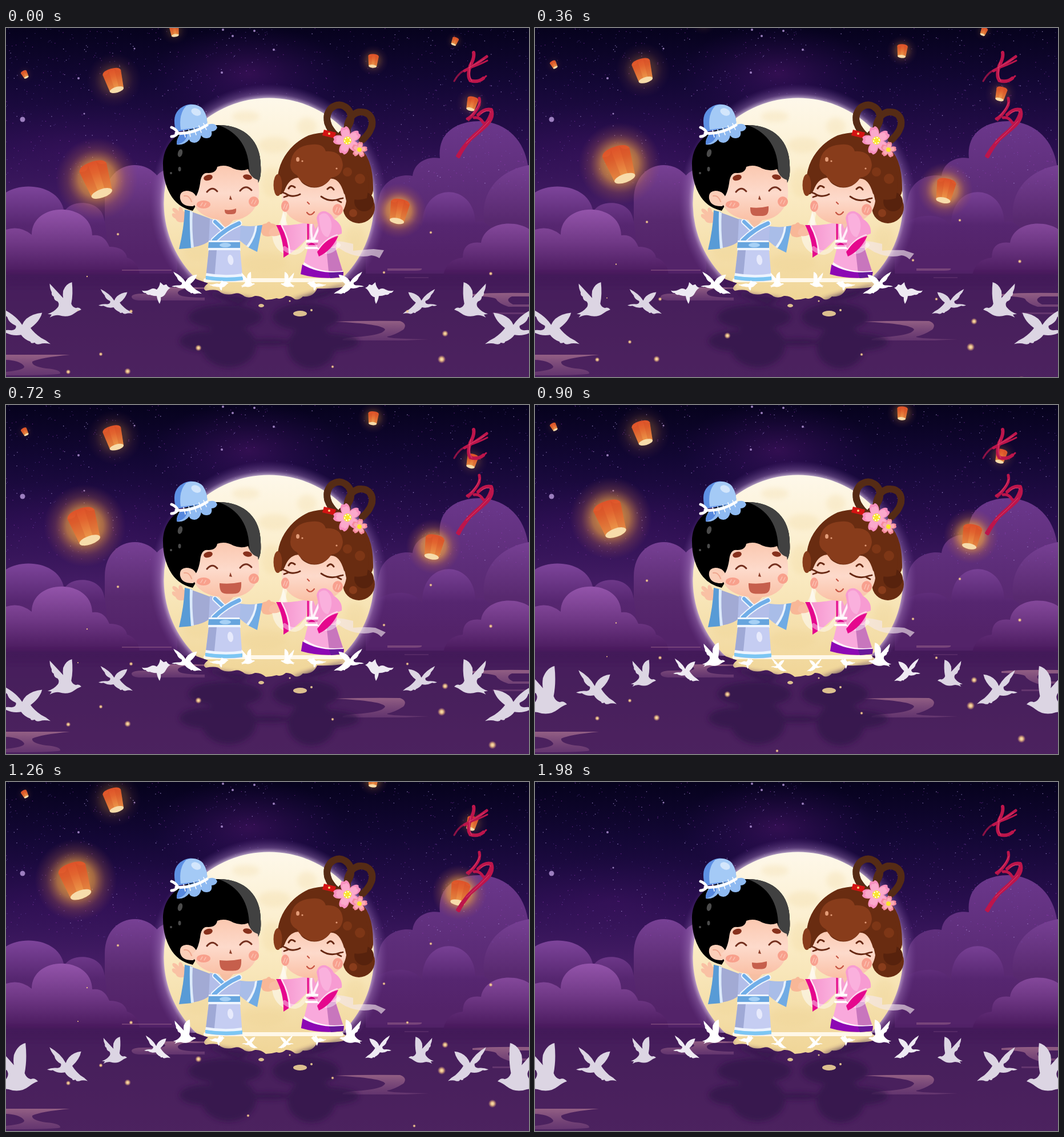
Recreate the animation shown at these times as an HTML page. Size 916 by 611 pixels, loop 2160 ms.

```html
<!DOCTYPE html>
<html lang="zh">
<head>
<meta charset="utf-8">
<title>七夕</title>
<style>
html, body { margin: 0; height: 100%; overflow: hidden; background: #2b1052; }
svg { display: block; width: 100vw; height: 100vh; }
.line { fill: none; stroke-linecap: round; stroke-linejoin: round; }
</style>
</head>
<body>
<svg viewBox="0 0 916 611" preserveAspectRatio="none">
<defs>
  <linearGradient id="sky" x2="0" y2="1">
    <stop stop-color="#06021d"/><stop offset=".16" stop-color="#130735"/><stop offset=".34" stop-color="#280e4d"/>
    <stop offset=".5" stop-color="#421b63"/><stop offset=".64" stop-color="#552468"/><stop offset=".71" stop-color="#411957"/>
    <stop offset=".8" stop-color="#462059"/><stop offset="1" stop-color="#50255f"/>
  </linearGradient>
  <radialGradient id="nebula"><stop stop-color="#7a2296" stop-opacity=".32"/><stop offset="1" stop-color="#4a1680" stop-opacity="0"/></radialGradient>
  <linearGradient id="backL" gradientUnits="userSpaceOnUse" x1="0" x2="0" y1="240" y2="400"><stop stop-color="#774094"/><stop offset=".6" stop-color="#58296f"/><stop offset="1" stop-color="#532369"/></linearGradient>
  <linearGradient id="midL" gradientUnits="userSpaceOnUse" x1="0" x2="0" y1="278" y2="400"><stop stop-color="#7d449a"/><stop offset=".55" stop-color="#562670"/><stop offset="1" stop-color="#532369"/></linearGradient>
  <linearGradient id="front" gradientUnits="userSpaceOnUse" x1="0" x2="0" y1="318" y2="432"><stop stop-color="#9354aa"/><stop offset=".5" stop-color="#703886"/><stop offset="1" stop-color="#48195c"/></linearGradient>
  <linearGradient id="backR" gradientUnits="userSpaceOnUse" x1="0" x2="0" y1="163" y2="400"><stop stop-color="#6b378b"/><stop offset=".5" stop-color="#5d2d79"/><stop offset="1" stop-color="#552469"/></linearGradient>
  <linearGradient id="moon" x2="0" y2="1"><stop stop-color="#fef8ea"/><stop offset=".45" stop-color="#fbecc6"/><stop offset="1" stop-color="#f0d597"/></linearGradient>
  <radialGradient id="halo"><stop offset=".88" stop-color="#efdcf5" stop-opacity=".7"/><stop offset=".92" stop-color="#b88fd0" stop-opacity=".34"/><stop offset="1" stop-color="#8053a8" stop-opacity="0"/></radialGradient>
  <linearGradient id="skin" x2="0" y2="1"><stop stop-color="#fbc8b0"/><stop offset=".5" stop-color="#fddacb"/><stop offset="1" stop-color="#fac0a5"/></linearGradient>
  <linearGradient id="paper" x2="0" y2="1"><stop stop-color="#de5129"/><stop offset=".35" stop-color="#e2642f"/><stop offset="1" stop-color="#eda04e"/></linearGradient>
  <radialGradient id="glow"><stop stop-color="#ffb03a" stop-opacity=".95"/><stop offset=".45" stop-color="#f0a040" stop-opacity=".62"/><stop offset=".72" stop-color="#c07048" stop-opacity=".24"/><stop offset="1" stop-color="#a05050" stop-opacity="0"/></radialGradient>
  <radialGradient id="spark"><stop stop-color="#ffe9b8"/><stop offset=".4" stop-color="#f5c98a" stop-opacity=".9"/><stop offset="1" stop-color="#d89a70" stop-opacity="0"/></radialGradient>
  <linearGradient id="stream" x2="0" y2="1"><stop stop-color="#b98098" stop-opacity=".66"/><stop offset="1" stop-color="#8a5488" stop-opacity=".4"/></linearGradient>
  <linearGradient id="sleeve" x2="1" y2="0"><stop stop-color="#f58fcb"/><stop offset="1" stop-color="#fbb4df"/></linearGradient>
  <filter id="blur" x="-30%" y="-30%" width="160%" height="160%"><feGaussianBlur stdDeviation="4"/></filter>
  <filter id="soft" x="-10%" y="-10%" width="120%" height="120%"><feGaussianBlur stdDeviation=".5"/></filter>
  <circle id="shine" r="72" fill="url(#glow)"/>
  <g id="lantern">
    <path fill="url(#paper)" d="M-25 -21Q-22 -31 0 -31T25 -21L19 27H-19Z"/>
    <path fill="#c84420" opacity=".25" d="M-25 -21Q-10 -15 -7 -28L-5 26H-19Z M9 -29Q14 -19 25 -21L19 27H7Z"/>
    <ellipse cy="27" rx="19" ry="7.5" fill="#f7dcaa"/>
  </g>
  <path id="up" d="M100 76Q92 68 84 72Q74 70 70 60Q76 34 72 0Q54 4 46 24Q44 36 46 44Q32 30 6 4Q6 18 12 28Q10 36 18 40Q18 50 30 54Q36 62 30 70Q18 84 0 88L12 90L6 98Q22 90 34 92Q60 100 80 86Q88 80 100 76Z"/>
  <path id="glide" d="M100 96Q92 86 82 80Q68 66 62 54Q80 36 84 14Q66 16 54 30Q48 38 46 46Q34 20 6 2Q10 16 18 26Q20 40 34 48Q36 58 26 60Q12 58 0 64Q8 68 14 66Q28 76 44 72Q50 84 62 90Q62 96 70 92Q72 98 80 96Q88 92 100 96Z"/>
  <path id="wide" d="M62 100Q68 84 66 70Q78 66 84 50Q92 30 100 26Q90 22 86 10L76 14L64 0Q62 22 52 34Q40 24 28 34Q14 44 0 38Q6 52 14 50Q18 60 28 58Q40 64 52 64Q54 84 62 100Z"/>
  <g id="petals"><path id="petal" d="M0 0C-12 -8 -9 -24 -3 -25Q0 -22 3 -25C9 -24 12 -8 0 0Z"/>
    <use href="#petal" transform="rotate(72)"/><use href="#petal" transform="rotate(144)"/><use href="#petal" transform="rotate(216)"/><use href="#petal" transform="rotate(288)"/></g>
</defs>

<rect width="916" height="611" fill="url(#sky)"/>
<ellipse cx="425" cy="80" rx="170" ry="85" fill="url(#nebula)"/>
<ellipse cx="130" cy="210" rx="260" ry="80" fill="url(#nebula)" opacity=".4"/>

<g id="clouds">
  <path fill="url(#backL)" d="M173 430V300C173 220 278 220 278 300V430ZM257 430V285C257 258 270 246 300 245V430Z"/>
  <path fill="url(#midL)" d="M0 430V288C30 268 95 275 102 322C112 300 160 300 170 328Q178 350 180 430Z"/>
  <path fill="url(#front)" d="M0 432V353Q25 345 45 362C45 303 150 303 151 363Q172 360 181 383Q208 383 212 402Q232 408 234 432Z"/>
  <path fill="url(#backR)" d="M630 430C635 380 645 330 655 290C665 262 695 255 712 259C715 235 738 224 760 228C755 183 790 163 830 163C880 165 908 200 914 240L916 430Z"/>
  <path fill="url(#backL)" d="M838 430V340C830 290 860 250 916 240V430Z"/>
  <path fill="url(#midL)" d="M729 430V350C725 268 820 268 822 340Q835 335 848 348V430ZM630 430V368C640 325 715 315 730 350V430Z"/>
  <path fill="url(#front)" d="M766 432Q772 405 800 402Q800 372 832 376C838 340 890 335 916 352V432Z"/>
</g>
<path d="M0 430H916V611H0Z" fill="#4a205f" opacity=".55"/>
<path d="M0 430H916V452H0Z" fill="#3f1757" opacity=".4" filter="url(#blur)"/>
<g id="stars"></g>

<g fill="url(#stream)">
  <path d="M220 470Q222 465 240 465H272Q285 462 273 457Q268 454 290 454H352V457H312Q296 461 303 467Q310 472 348 472V477H236Q220 477 220 470Z"/>
  <path d="M575 514Q640 512 690 513Q704 518 696 528Q680 538 668 540Q662 544 740 545L700 547H590Q585 543 612 541Q660 538 664 528Q660 518 575 514Z"/>
  <path d="M0 572H112Q60 577 46 584Q44 592 70 596Q96 598 95 605Q90 608 0 608V602Q40 598 30 590Q22 582 0 581Z"/>
  <path d="M817 466Q850 463 916 464V470H886Q872 476 888 484H916V488H880Q862 482 858 474Q850 470 817 469ZM852 498H916V501H852Z"/>
  <path opacity=".6" d="M203 423H290V425H203ZM668 421H728Q730 425 716 425H668ZM698 436H740V438H698Z"/>
</g>

<circle cx="460" cy="306" r="208" fill="url(#halo)" clip-path="inset(0 0 75px 0)"/>
<path fill="url(#moon)" d="M334 440A184 184 0 1 1 587 440Q600 444 596 450Q590 457 545 456Q538 472 520 470Q514 477 506 475Q498 468 490 469Q482 476 474 473Q464 476 455 476Q446 468 436 469Q426 474 418 470Q408 462 400 465Q386 469 376 463Q370 456 350 460Q342 456 354 447Z"/>
<g fill="#eccf8c" opacity=".22" filter="url(#blur)">
  <ellipse cx="527" cy="172" rx="17" ry="15"/><ellipse cx="470" cy="205" rx="28" ry="14"/><ellipse cx="465" cy="270" rx="18" ry="26"/>
  <ellipse cx="452" cy="410" rx="40" ry="17"/><ellipse cx="335" cy="390" rx="24" ry="17"/><ellipse cx="612" cy="370" rx="18" ry="25"/><ellipse cx="420" cy="155" rx="24" ry="10"/>
</g>
<g fill="#33124a" opacity=".75" filter="url(#blur)">
  <path d="M330 440Q348 452 350 462L400 470L432 474L410 484Q345 470 330 440ZM598 448L560 470Q528 480 498 478L540 464Z"/>
  <ellipse cx="384" cy="506" rx="64" ry="22"/><ellipse cx="390" cy="556" rx="48" ry="38"/><ellipse cx="350" cy="548" rx="46" ry="18"/>
  <ellipse cx="525" cy="506" rx="58" ry="24"/><ellipse cx="535" cy="558" rx="42" ry="38"/><ellipse cx="560" cy="550" rx="58" ry="16"/><ellipse cx="460" cy="550" rx="40" ry="6"/>
</g>
<g fill="#dcc08f"><ellipse cx="447" cy="486" rx="5" ry="3"/><ellipse cx="515" cy="500" rx="12" ry="5"/><circle cx="535" cy="494" r="2"/><circle cx="497" cy="478" r="1.5"/></g>
<rect x="346" y="438" width="245" height="7" rx="3.5" fill="#fff8e8" filter="url(#soft)"/>

<g id="lanterns"></g>

<g id="boy">
  <g id="boyArms">
    <path fill="#f9c1a4" d="M316 338Q301 344 297 334Q289 330 291 325Q294 323 298 326Q288 318 293 315Q297 314 303 321Q301 314 305 313Q310 315 310 320Q318 324 316 338Z"/>
    <path fill="#f8b797" d="M444 352Q446 343 456 342Q461 336 464 342Q474 343 474 348Q472 352 468 352Q476 356 470 361Q460 368 450 363Z"/>
    <path fill="#a2aad4" d="M314 318Q338 326 366 337L357 372Q342 385 304 386Q312 350 314 318Z"/>
    <path fill="#589bd6" d="M313 318L326 321Q322 350 326 385L303 387Q312 350 313 318Z"/>
    <path fill="#dceafa" d="M322 320L327 322Q325 352 329 384L324 385Q321 350 322 320Z"/>
    <path fill="#a9bde8" d="M396 343Q425 350 448 345L439 391Q415 380 404 366Z"/>
    <path fill="#70abe4" d="M440 346L449 345L440 392L424 384Q438 364 440 346Z"/>
    <path fill="#e9f2fd" d="M436 347L440 346Q438 366 425 384L421 382Q435 364 436 347Z"/>
  </g>
  <path fill="#b3bee9" d="M357 334L372 337L384 350L402 338L411 350L409 378H355Z"/>
  <path fill="#f6bfa3" d="M370 330H404L384 352Z"/>
  <path class="line" stroke="#eef5fe" stroke-width="10" d="M366 339L384 356"/>
  <path class="line" stroke="#71aee8" stroke-width="6" d="M366 339L384 356"/>
  <path class="line" stroke="#eef5fe" stroke-width="11" d="M408 342Q384 352 364 372"/>
  <path class="line" stroke="#71aee8" stroke-width="7" d="M408 342Q384 352 364 372"/>
  <path fill="#eef5fe" d="M355 372H409L411 390H354Z"/><path fill="#67a5de" d="M355 375H410V385H354Z"/>
  <ellipse cx="384" cy="380" rx="10" ry="4" fill="#a6d0f5"/>
  <g id="boySkirt">
    <path fill="#c5cdf2" d="M355 389H410L414 442Q382 446 349 440Z"/>
    <path fill="#9fa9d6" d="M355 389H369L364 440L349 439Z"/>
    <path fill="#edf4fe" d="M350 429Q382 435 413 430V436Q382 440 349 434Z"/>
    <path fill="#7cc6f3" d="M349 434Q382 439 414 435V441Q382 446 349 440Z"/>
    <ellipse cx="393" cy="406" rx="5" ry="9" fill="#e7eafc" transform="rotate(-8 393 406)"/>
  </g>
  <path fill="#000" d="M327 320Q300 314 287 290Q275 268 275 240C275 190 320 168 372 170C420 170 446 200 446 240Q448 262 440 274L345 290Z"/>
  <path fill="#414141" d="M372 170C420 170 446 200 446 240Q448 262 440 274L426 258Q428 190 372 170Z"/>
  <path fill="#fbceb8" d="M336 303Q332 285 316 285Q303 286 305 299Q308 313 328 312Z"/>
  <path class="line" stroke="#eea68e" stroke-width="2" d="M312 294Q321 292 325 304"/>
  <path fill="url(#skin)" d="M327 300Q336 296 340 272Q342 252 354 254Q368 254 370 243Q384 238 398 246Q412 252 424 247Q428 262 441 266Q446 290 440 306Q428 337 390 337C352 337 330 322 327 300Z"/>
  <g fill="#f8a08c"><ellipse cx="346" cy="309" rx="12" ry="7"/><ellipse cx="434" cy="304" rx="9" ry="9"/></g>
  <path class="line" stroke="#fbc0b0" stroke-width="1.5" d="M341 311L344 306M347 312L350 307M430 307L433 301M435 308L438 302"/>
  <g fill="#87301c"><ellipse cx="354" cy="262" rx="8" ry="5" transform="rotate(-15 354 262)"/><ellipse cx="423" cy="261" rx="8" ry="4.5" transform="rotate(12 423 261)"/></g>
  <path class="line" stroke="#74301f" stroke-width="3" d="M352 287Q361 276 370 286M410 285Q420 273 430 284"/>
  <path fill="#8d402c" d="M393 293L396 301L391 300Z"/>
  <path id="mouth" fill="#c65f4c"/>
  <g fill="#4b4b4b"><ellipse cx="305" cy="219" rx="4" ry="7" transform="rotate(15 305 219)"/><ellipse cx="304" cy="247" rx="2.5" ry="4"/><circle cx="289" cy="254" r="2"/></g>
  <path fill="#5e91e4" d="M298 182Q289 152 306 140Q325 126 344 142Q354 155 352 172Z"/>
  <path fill="#a4caf6" d="M306 178Q302 150 316 136Q334 130 345 142Q354 155 352 172Z"/>
  <ellipse cx="333" cy="147" rx="9" ry="6" fill="#d3e6fc" transform="rotate(25 333 147)"/>
  <path fill="#8fbaf1" d="M306 184L352 170Q366 164 370 174Q368 181 360 181Q362 192 352 193Q344 193 342 188Q340 200 330 201Q321 200 321 195Q312 206 299 204Q298 195 306 184Z"/>
  <path fill="#5688de" d="M306 186L318 182Q318 200 299 204Q298 195 306 186Z"/>
  <path class="line" stroke="#fff" stroke-width="5" d="M298 184Q325 187 352 170M290 174Q298 177 301 184Q296 190 290 190"/>
  <path class="line" stroke="#fff" stroke-width="1.5" d="M311 179L314 191M320 178L323 190M329 175L333 187M338 171L342 183M346 167L351 178"/>
</g>

<g id="girl">
  <path fill="#fff" opacity=".5" d="M486 322Q478 350 466 358Q466 385 488 396Q482 360 493 344Z"/>
  <path class="line" stroke="#fff" stroke-width="8" opacity=".45" d="M490 318Q480 352 494 372Q520 394 512 350"/>
  <path id="tail" fill="#f6e9ee" opacity=".62"/>
  <path fill="#f9bda2" d="M462 353Q468 347 478 349L480 362Q466 368 460 360Z"/>
  <path fill="url(#sleeve)" d="M528 340Q500 347 474 345Q486 372 487 401Q505 392 526 370Z"/>
  <path fill="#e5078d" d="M473 345L481 345Q495 370 495 396L486 402Q487 370 473 345Z"/>
  <path class="line" stroke="#ffe6f5" stroke-width="2.5" d="M483 346Q496 370 497 394"/>
  <path fill="#f6a0d3" d="M527 340H582L578 386H529Z"/><path fill="#f6c4b0" d="M536 338H552L542 352Z"/>
  <path class="line" stroke="#e5078d" stroke-width="3" d="M529 342V372"/><path class="line" stroke="#fff0f8" stroke-width="4" d="M535 341Q533 356 537 374M552 340L538 372"/>
  <g id="girlSkirt">
    <path fill="#f9a9dc" d="M529 384H577L591 430Q552 444 517 430Z"/>
    <path fill="#c876bd" d="M561 385H577L591 430Q580 436 566 436Z"/>
    <path fill="#fff4fa" d="M522 410Q550 430 590 425V430Q550 434 519 418Z"/>
    <path fill="#8d08b4" d="M519 414Q550 432 591 427L590 436Q550 441 516 431Z"/>
    <path fill="#68189b" d="M565 428L591 427L590 436L568 438Z"/>
  </g>
  <path class="line" stroke="#fff" stroke-width="4" d="M527 373H556M526 385H552"/><path class="line" stroke="#dc0c8c" stroke-width="4" d="M528 378H556"/>
  <path class="line" stroke="#fff" stroke-width="8" opacity=".42" d="M488 386Q508 402 522 382Q536 362 548 382Q560 402 582 380"/>

  <path id="loops" class="line" stroke="#552b15" stroke-width="12" d="M580 190C543 158 572 124 594 138C612 150 604 172 588 186M598 184C594 154 618 138 636 152C648 166 638 184 624 196"/>
  <use href="#loops" stroke-dasharray="4 10" style="stroke:#70401f"/>
  <path fill="#692c11" d="M474 285Q474 214 530 188Q590 170 626 216Q644 238 643 285Q640 306 605 306L560 270Z"/>
  <circle cx="618" cy="314" r="28" fill="#692c11"/><circle cx="627" cy="304" r="17" fill="#57220d"/><circle cx="608" cy="324" r="7" fill="#883c1b"/>
  <path fill="url(#skin)" d="M483 290Q488 262 506 256L576 258Q592 278 596 303Q590 343 536 343C498 343 482 320 483 290Z"/>
  <path fill="#692c11" d="M475 272Q476 214 530 192Q590 184 626 230Q640 260 632 298Q606 306 592 290Q584 262 568 264Q556 282 534 279Q516 274 514 262Q496 262 488 284Q482 296 475 288Z"/>
  <path fill="#883c1b" d="M498 240Q500 206 536 204Q556 202 560 216Q588 214 590 240Q588 260 570 262Q556 282 534 278Q514 270 510 258Q498 252 498 240Z"/>
  <ellipse cx="476" cy="275" rx="7.5" ry="19" fill="#883c1b"/>
  <g fill="#7d3616"><circle cx="598" cy="252" r="8"/><circle cx="620" cy="264" r="9"/></g>
  <g fill="#e39c78"><ellipse cx="511" cy="230" rx="3" ry="4"/><circle cx="519" cy="233" r="1.6"/><circle cx="579" cy="246" r="1.6"/></g>
  <g fill="#f8a08f"><ellipse cx="489" cy="312" rx="7" ry="10"/><ellipse cx="581" cy="318" rx="9" ry="10"/></g>
  <path class="line" stroke="#fcc2b4" stroke-width="1.5" d="M486 316L489 308M490 317L493 309M577 322L580 314M582 323L585 315"/>
  <path class="line" stroke="#672813" stroke-width="2.8" d="M490 290Q501 298 515 291M552 295Q567 306 585 299M490 290L485 288M493 294L487 296M585 299L590 298M581 302L587 305"/>
  <path class="line" stroke="#672813" stroke-width="3" d="M495 281Q499 273 506 279M563 282Q569 275 574 283"/>
  <path class="line" stroke="#c65443" stroke-width="2.2" d="M527 323Q533 331 540 322M528 305L531 308"/>
  <path fill="#f79bd2" d="M544 333Q547 319 560 321Q571 326 574 334Q590 344 588 360Q574 364 562 375Q548 390 545 383Q551 358 544 333Z"/>
  <path fill="#fab0dd" d="M548 329Q560 318 568 334Q574 350 564 366Q550 366 548 329Z"/>
  <path fill="#e5078d" d="M582 364Q570 390 548 400L545 392Q558 370 582 364Z"/>
  <path class="line" stroke="#ffd9ef" stroke-width="2" d="M580 362Q560 368 547 388"/>
  <path fill="#d41313" d="M557 178L578 183L575 193L554 188Z"/><circle cx="566" cy="185" r="2" fill="#fbd27a"/>
  <g transform="translate(598 197) rotate(-14)"><use href="#petals" fill="#f88fbe"/><use href="#petals" fill="#fba9cc" transform="scale(.8)"/><circle r="7" fill="#f9e52c"/><circle r="5" class="line" stroke="#fff" stroke-width="2" stroke-dasharray="1 4"/></g>
  <g transform="translate(619 213) rotate(10) scale(.56)"><use href="#petals" fill="#f58a9e"/><use href="#petals" fill="#fbacb4" transform="scale(.75)"/><circle r="7" fill="#f9e52c"/></g>
</g>

<g id="birdsA"></g><use href="#birdsA" transform="translate(917) scale(-1 1)"/>
<g id="birdsB"></g><use href="#birdsB" transform="translate(917) scale(-1 1)"/>

<g id="sparks"></g>

<g role="img" aria-label="七夕" class="line" filter="url(#soft)">
  <g stroke="#bd154b">
    <path stroke-width="3" opacity=".7" d="M785 93Q794 76 808 72"/>
    <path stroke-width="5" d="M803 75Q820 66 842 50"/><path stroke-width="3" d="M812 70Q826 66 843 57"/>
    <path stroke-width="6" d="M819 43Q821 52 813 66Q807 86 814 92Q826 96 836 88"/><path stroke-width="3" d="M812 93Q828 98 841 84"/>
    <path stroke-width="5" d="M829 123Q832 134 822 146Q814 156 808 159"/><path stroke-width="2.5" opacity=".8" d="M830 135Q822 152 810 162"/>
    <path stroke-width="6" d="M827 152Q838 140 850 143Q855 156 842 170Q824 186 813 195Q799 212 793 225"/>
    <path stroke-width="4" d="M850 143Q848 160 830 178Q806 196 790 224"/>
    <path stroke-width="5" d="M820 157Q830 155 836 166"/>
  </g>
  <path stroke="#ea5a80" stroke-width="1" opacity=".7" d="M810 70L838 54M814 60Q808 82 816 93M830 130Q824 144 814 154M832 150Q842 142 849 147M846 163Q828 182 806 202"/>
</g>
</svg>
<script>
const $ = id => document.getElementById(id);
const FRAME = 180, LOOP = 2160;

// Stars
let seed = 7;
const rnd = () => (seed = seed * 16807 % 2147483647) / 2147483647;
const starPath = (n, size) => {
  let d = '';
  for (let i = 0; i < n; i++) {
    const x = rnd() * 916, y = 280 * rnd() ** 1.1;
    d += `M${x.toFixed(1)} ${y.toFixed(1)}h${size}v${size}h-${size}z`;
  }
  return d;
};
const starSets = [['#7c5bc4', 600, 1, .6], ['#a03fc0', 350, 1.2, .6], ['#b9a4e8', 120, 1.3, .7]];
$('stars').innerHTML = starSets.map(([c, n, s, o]) =>
  `<path fill="${c}" opacity="${o}" d="${starPath(n, s)}"/>`).join('') +
  [[29, 160, 4.5], [127, 88, 2], [380, 3, 2], [435, 5, 2], [397, 14, 2], [469, 38, 2], [137, 150, 1.5], [225, 36, 1.5], [378, 78, 2]]
    .map(([x, y, r]) => `<circle cx="${x}" cy="${y}" r="${r}" fill="#b093d4" opacity=".85"/>`).join('');

// x, y, scale, tilt, glow, dx and dy per step
const lanterns = [
  [159, 264, 1, -19, 1, -5.25, -13.2], [189, 91, .66, -16, .35, 0, -8.6], [33, 81, .22, -28, .1, 0, -8.6],
  [295, 4, .34, -8, .2, 0, -8.6], [643, 57, .37, 5, .35, 0, -8.6], [786, 23, .23, 22, .15, 0, -8.6],
  [816, 132, .39, 14, .25, 0, -8.6], [688, 320, .67, 11, 1, 15.2, -18.1]
];
$('lanterns').innerHTML = lanterns.map(l =>
  `<g><use href="#shine" opacity="${l[4]}"/><use href="#lantern"/></g>`).join('');

// x, y, radius
const sparks = [
  [196, 361, 2], [142, 435, 1.2], [337, 560, 4], [213, 601, 4], [166, 571, 2.5], [109, 602, 3], [744, 358, 2],
  [662, 428, 2], [769, 535, 4], [763, 580, 5], [849, 430, 2.5], [572, 593, 2], [219, 496, 2.5], [126, 494, 1],
  [852, 638, 5], [703, 496, 2], [424, 659, 2], [715, 677, 2], [805, 700, 2.5], [217, 693, 2]
];
$('sparks').innerHTML = sparks.map(([x, y, r]) =>
  `<circle cx="${x}" cy="${y}" r="${r * 1.45}" fill="url(#spark)"/>`).join('');

// Left half of the flock, pose and box; the right half is its mirror
const flock = list => list.map(([pose, x, y, w, h], i) =>
  `<use href="#${pose}" fill="${i < 3 ? '#dcd5e3' : i < 4 ? '#eeeaf2' : '#fff'}" transform="translate(${x} ${y}) scale(${w / 100} ${h / 100})"/>`).join('');
$('birdsA').innerHTML = flock([
  ['glide', -14, 489, 92, 67], ['up', 73, 445, 59, 63], ['glide', 162, 456, 60, 46], ['wide', 238, 445, 50, 38],
  ['glide', 290, 426, 53, 41], ['wide', 356, 442, 34, 18], ['up', 411, 427, 25, 28]]);
$('birdsB').innerHTML = flock([
  ['up', -22, 457, 78, 88], ['glide', 72, 463, 71, 63], ['up', 168, 446, 44, 48], ['glide', 242, 443, 46, 42],
  ['up', 293, 416, 40, 43], ['wide', 356, 443, 27, 19], ['glide', 413, 443, 28, 24]]);

const clamp = v => Math.max(0, Math.min(1, v));

function draw(now) {
  const k = Math.floor(now % LOOP / FRAME);
  const fade = clamp((11 - k) / 4);
  const open = clamp(Math.min(k, 12 - k) / 3);
  const sway = clamp(k / 3);

  lanterns.forEach(([x, y, s, a, , dx, dy], i) => $('lanterns').children[i].setAttribute('transform',
    `translate(${x + dx * k} ${y + dy * k}) rotate(${a}) scale(${s})`));
  $('lanterns').setAttribute('opacity', fade);
  $('sparks').setAttribute('opacity', fade);
  $('sparks').setAttribute('transform', `translate(0 ${-10.7 * k})`);

  $('birdsA').style.display = k % 2 ? 'none' : '';
  $('birdsB').style.display = k % 2 ? '' : 'none';

  const w = 10 + 9 * open, top = 317 - 6 * open, low = 326 + 4.5 * open;
  $('mouth').setAttribute('d', `M${393 - w} ${top + 1}Q393 ${top + 3} ${393 + w} ${top - 1}` +
    `C${394 + w} ${low} ${393 + w * .7} ${low} 393 ${low}S${393 - w} ${low} ${393 - w} ${top + 1}Z`);
  $('boyArms').setAttribute('transform', `translate(0 ${2 * sway})`);
  $('boySkirt').setAttribute('transform', `translate(382 389) skewX(${1 - sway}) translate(-382 -389)`);
  $('girlSkirt').setAttribute('transform', `translate(552 384) skewX(${sway}) translate(-552 -384)`);
  const x = 662 + 3 * sway, y = 389 + 9 * sway;
  $('tail').setAttribute('d', `M572 372Q594 374 608 378V390Q628 388 ${x - 18} ${y - 2 - 6 * sway}L${x} ${y}` +
    `L${x - 8} ${403 + 3 * sway}Q${x - 14} 399 ${x - 22} 398Q620 404 594 392Q582 384 572 380Z`);
}

function tick() {
  draw(performance.now());
  requestAnimationFrame(tick);
}
tick();
</script>
</body>
</html>
```
